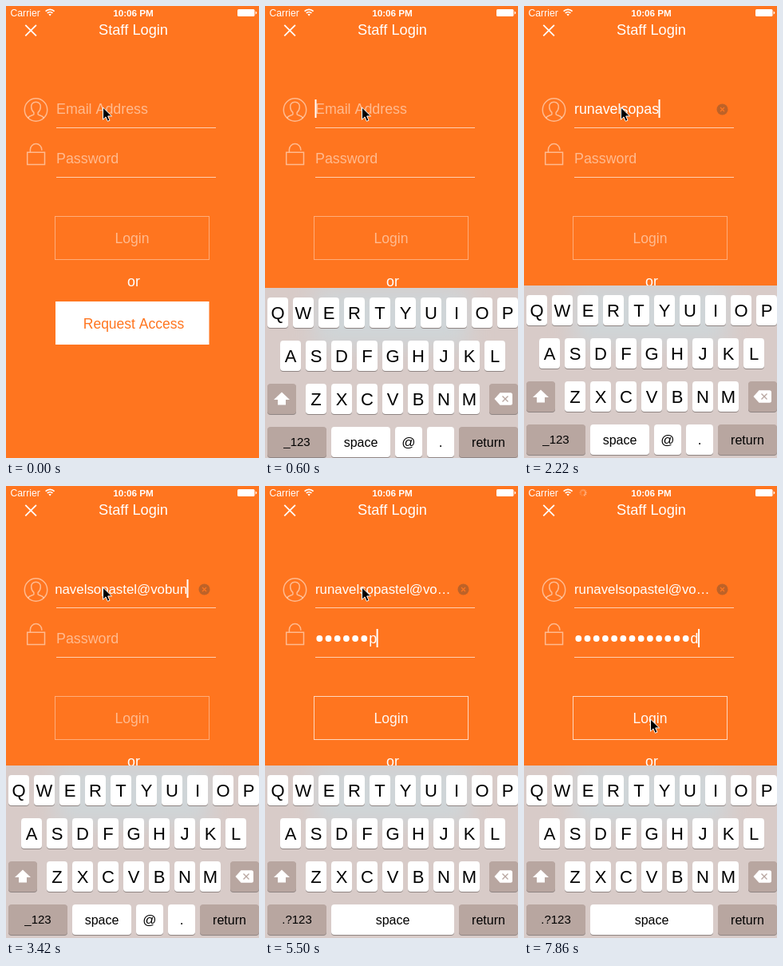
These frames come from a looping animation (317x566 px, 8000 ms). An HTML page:

```html
<!DOCTYPE html>
<html lang="en">
<head>
<meta charset="utf-8">
<title>Staff Login</title>
<style>
  html, body { margin: 0; width: 100%; height: 100%; overflow: hidden; background: #ff751f; }
  svg { display: block; width: 100%; height: 100%; }
  text { font: 17.83px "Liberation Sans", Arial, sans-serif; font-kerning: none; fill: #fff; white-space: pre; }
  .mid { text-anchor: middle; }
  .hint { fill-opacity: .5; }
  .line { fill: none; stroke: #fff; }
  .keys text { fill: #000; text-anchor: middle; }
</style>
</head>
<body>
<svg id="stage" viewBox="0 0 317 566">
  <defs>
    <clipPath id="fieldClip"><rect x="62" y="112" width="172" height="34"/></clipPath>
    <clipPath id="boardClip"><rect y="350" width="317" height="216"/></clipPath>
    <filter id="blur" x="-30%" y="-60%" width="160%" height="220%"><feGaussianBlur stdDeviation="14"/></filter>
  </defs>
  <rect width="317" height="566" fill="#ff751f"/>

  <g id="statusBar">
    <text x="5.5" y="12.5" style="font-size:12.2px">Carrier</text>
    <g class="line" stroke-width="1.7">
      <path d="M49.6 6.6a7.8 7.8 0 0 1 11 0M51.8 8.9a4.7 4.7 0 0 1 6.6 0"/>
      <path d="M53.4 10.5a2.4 2.4 0 0 1 3.4 0l-1.7 1.9z" fill="#fff" stroke="none"/>
    </g>
    <g id="spinner" class="line"></g>
    <text class="mid" x="159.5" y="12.5" style="font-size:11.7px;font-weight:bold">10:06 PM</text>
    <rect x="290" y="4" width="21.5" height="9" rx="1.5" fill="#fff"/>
    <path d="M312.6 6.6q1.6 .4 1.6 1.9t-1.6 1.9z" fill="#fff"/>
  </g>

  <path class="line" stroke-width="1.8" d="M24.3 23.8l13.6 13.6m0-13.6l-13.6 13.6"/>
  <text class="mid" x="159.5" y="36" style="font-size:18.2px">Staff Login</text>

  <g class="line" stroke-opacity=".5" stroke-width="1.5">
    <circle cx="37.5" cy="130" r="14.2"/>
    <path d="M37.5 120.3c-4 0-6 2.7-5.8 6.3 .2 3.5 1.6 5.4 3.2 6.8v2.3c-1.600 1.600-5.600 1.400-7.400 4.600M37.500 120.300c4 0 6 2.700 5.800 6.300-.2 3.500-1.600 5.400-3.200 6.800v2.300c1.600 1.600 5.600 1.400 7.400 4.600"/>
    <path d="M26.700 183.300h21.800v15.200h-21.800zM30.400 183v-3.200a7.200 7.200 0 0 1 14.400 0v1"/>
  </g>
  <path class="line" stroke-opacity=".65" d="M63 152.500h200M63 214.500h200"/>

  <text id="emailHint" class="hint" x="63" y="135">Email Address</text>
  <g clip-path="url(#fieldClip)"><text id="email" y="135"></text></g>
  <g id="clear">
    <circle cx="248.500" cy="129.500" r="7" fill="#bd6228"/>
    <path d="M246 127l5 5m0-5l-5 5" stroke="#ff751f" stroke-width="1.300"/>
  </g>

  <text id="passHint" class="hint" x="63" y="197">Password</text>
  <path id="bullets" class="line" stroke-width="7.800" stroke-linecap="round" stroke-dasharray="0 11.2"/>
  <text id="lastChar" y="197"></text>
  <rect id="caret" width="2" height="23" fill="#fff"/>

  <g id="login">
    <rect class="line" x="61.500" y="263.500" width="193" height="54"/>
    <text class="mid" x="158" y="297" style="font-size:17.500px">Login</text>
  </g>
  <text class="mid" x="160" y="351">or</text>
  <rect x="62" y="370" width="192.500" height="54" fill="#fff"/>
  <text class="mid" x="160" y="404" style="font-size:17.500px;fill:#ff751f">Request Access</text>

  <g id="board" class="keys">
    <rect y="350" width="317" height="216" fill="#d8cbc8"/>
    <g clip-path="url(#boardClip)">
      <rect x="62" y="350" width="193" height="74" fill="#cfd5d8" filter="url(#blur)"/>
    </g>
    <g id="letterKeys"></g>
    <g id="emailKeys"></g>
    <g id="plainKeys"></g>
    <path d="M21 480.500l10 9.500h-5v6.500h-10v-6.500h-5z" fill="#fff"/>
    <path d="M287.500 489l7-7.800h13q2.500 0 2.500 2.500v10.600q0 2.500-2.500 2.500h-13z" fill="#fff"/>
    <path d="M297.500 485.500l7 7m0-7l-7 7" stroke="#b8a6a0" stroke-width="1.400"/>
  </g>

  <path id="pointer" d="M0 0v15.200l3.500-3.300 2.300 5.400 2.700-1.100-2.300-5.300h4.900z" fill="#000" stroke="#fff" stroke-width="1"/>
</svg>
<script>
const LOOP = 8000, LEFT = 63, FIELD = 164, PITCH = 11.2;
const EMAIL = "runavelsopastel@vobun.vom";
const PASSWORD = "secretpassword";

// Each step is [start time in ms, value held until the next step].
const emailSteps = [[0, 0], [900, 1], [1040, 2], [1190, 4], [1340, 5], [1480, 6], [1630, 9],
  [1920, 10], [2070, 11], [2220, 12], [2370, 13], [2520, 14], [2670, 16],
  [2970, 17], [3120, 18], [3270, 20], [3420, 21], [3720, 23], [3860, 25]];
const passSteps = [[0, 0], [4610, 1], [4760, 2], [4910, 3], [5060, 4], [5210, 6],
  [5500, 7], [5650, 8], [5800, 9], [5950, 10], [6100, 12], [6250, 13], [6540, 14]];
const boardSteps = [[0, 220], [450, 44], [600, 3], [750, 0]];
const caretSteps = [[0, 0], [450, 1], [7130, 0], [7560, .5], [7710, 1]];
const pointerSteps = [[0, 0], [6690, .03], [6840, .2], [6980, .55], [7130, .85], [7270, .97], [7420, 1]];
const spinnerSteps = [[0, -1], [7420, 0], [7560, 2], [7710, 4], [7860, 6]];
const PASSWORD_FOCUS = 4310;

const $ = id => document.getElementById(id);
const at = (steps, t) => steps.findLast(([start]) => start <= t)[1];
const show = (el, on) => el.setAttribute("visibility", on ? "visible" : "hidden");

function key(group, x, y, width, label, size = 22, dark = false) {
  const box = (top, fill) => `<rect x="${x}" y="${top}" width="${width}" height="38" rx="4" fill="${fill}"/>`;
  $(group).innerHTML += box(y + 1, "#8f8583") + box(y, dark ? "#b8a6a0" : "#fff") +
    `<text x="${x + width / 2}" y="${y + 19 + size * .36}" style="font-size:${size}px">${label}</text>`;
}

[["QWERTYUIOP", 3, 362], ["ASDFGHJKL", 19, 416], ["ZXCVBNM", 51, 470]].forEach(([row, x, y]) =>
  [...row].forEach((letter, i) => key("letterKeys", x + 32 * i, y, 26, letter)));
key("letterKeys", 3, 470, 36, "", 16, true);
key("letterKeys", 281, 470, 36, "", 16, true);
key("letterKeys", 243, 524, 74, "return", 16, true);
key("emailKeys", 3, 524, 74, "_123", 15, true);
key("emailKeys", 83, 524, 74, "space", 16);
key("emailKeys", 163, 524, 34, "@", 17);
key("emailKeys", 203, 524, 34, ".", 17);
key("plainKeys", 3, 524, 74, ".?123", 15, true);
key("plainKeys", 83, 524, 154, "space", 16);

for (let i = 0; i < 12; i++)
  $("spinner").innerHTML += `<path d="M0 -2.300v-2.300" transform="rotate(${i * 30})" stroke-opacity="${.1 + .05 * i}"/>`;

// Draws the email field and returns where its caret belongs.
function drawEmail(t) {
  const email = $("email"), count = at(emailSteps, t), done = t >= PASSWORD_FOCUS;
  email.textContent = done ? EMAIL.slice(0, 18) + "…" : EMAIL.slice(0, count);
  email.style.fontSize = "17.83px";
  if (count && email.getComputedTextLength() > FIELD + 1) email.style.fontSize = "16.84px";
  const width = count ? email.getComputedTextLength() : 0;
  const scroll = done ? 0 : Math.max(0, width - FIELD);
  email.setAttribute("x", LEFT - scroll);
  show($("emailHint"), !count);
  show($("clear"), count);
  return LEFT + width - scroll;
}

function drawPassword(t) {
  const count = at(passSteps, t), last = $("lastChar"), x = LEFT + PITCH * Math.max(0, count - 1);
  last.textContent = count ? PASSWORD[count - 1] : "";
  last.setAttribute("x", x);
  $("bullets").setAttribute("d", `M${LEFT + 5.300} 191h${Math.max(0, count - 2) * PITCH + .1}`);
  show($("bullets"), count > 1);
  show($("passHint"), !count);
  $("login").setAttribute("opacity", count ? .95 : .5);
  $("login").firstElementChild.setAttribute("stroke-opacity", count ? .75 : .8);
  return x + (count ? last.getComputedTextLength() : 0);
}

function draw(t) {
  const emailEnd = drawEmail(t), passEnd = drawPassword(t), inPassword = t >= PASSWORD_FOCUS;
  $("caret").setAttribute("x", (inPassword ? passEnd : emailEnd) - .5);
  $("caret").setAttribute("y", inPassword ? 179 : 117);
  $("caret").setAttribute("opacity", at(caretSteps, t));

  $("board").setAttribute("transform", `translate(0 ${at(boardSteps, t)})`);
  show($("emailKeys"), !inPassword);
  show($("plainKeys"), inPassword);

  const move = at(pointerSteps, t);
  $("pointer").setAttribute("transform", `translate(${121.500 + 37 * move} ${127 + 165 * move})`);

  const turn = at(spinnerSteps, t);
  show($("spinner"), turn >= 0);
  $("spinner").setAttribute("transform", `translate(74 8.500) rotate(${turn * 30})`);
}

function tick() {
  draw(performance.now() % LOOP);
  requestAnimationFrame(tick);
}
tick();
</script>
</body>
</html>
```
